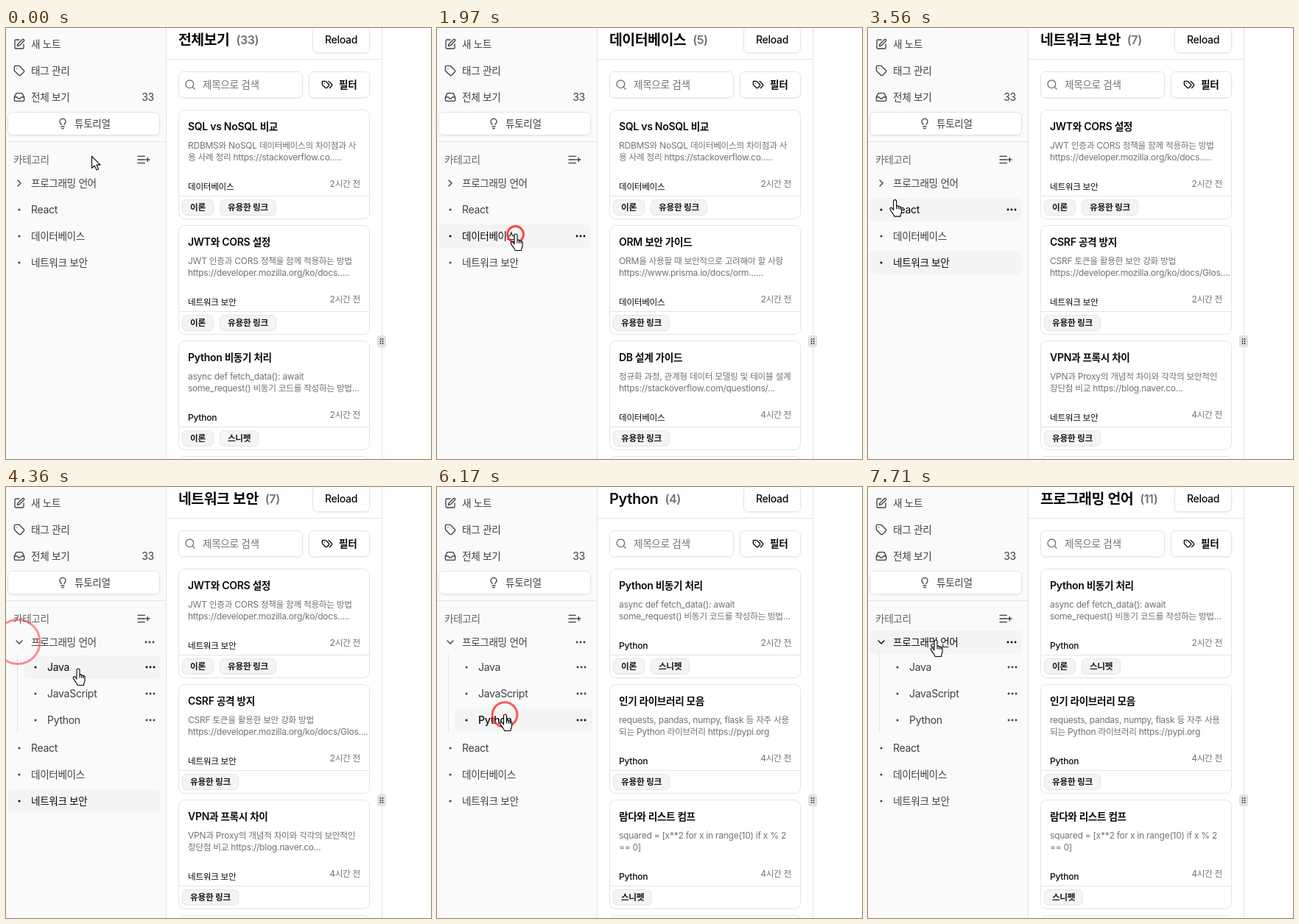
These frames come from a looping animation (577x586 px, 8.24 s). An HTML page:

```html
<!DOCTYPE html>
<html lang="ko">
<head>
<meta charset="utf-8">
<style>
html, body { margin: 0; width: 100%; height: 100%; overflow: hidden; background: #fff; }
svg { display: block; width: 577px; height: 586px; }
text { font-family: Inter, "Noto Sans CJK KR", "Noto Sans CJK", sans-serif; letter-spacing: -.02em; white-space: pre; }
.ko { font-family: "Noto Sans CJK KR", "Noto Sans CJK", sans-serif; font-size: .97em; letter-spacing: -.025em; }
.icon { fill: none; stroke-width: 2; stroke-linecap: round; stroke-linejoin: round; }
</style>
</head>
<body>
<svg viewBox="0 0 577 586">
  <defs>
    <clipPath id="column"><rect x="234" y="0" width="259.5" height="586"/></clipPath>
    <filter id="soft" x="-10%" y="-20%" width="120%" height="150%">
      <feDropShadow dx="0" dy="1" stdDeviation="1" flood-opacity=".07"/>
    </filter>
  </defs>
  <rect width="577" height="586" fill="#fff"/>
  <rect width="217" height="586" fill="#fafafa"/>
  <g id="chrome"></g>
  <g id="tree"></g>
  <g id="notes"></g>
  <g id="rings" fill="none" stroke="#ff2020" stroke-width="3"></g>
  <g id="cursor" fill="#fff" stroke="#000" stroke-width="1.1" stroke-linejoin="round">
    <path id="arrow" d="M0 0v16l3.7-3.4 2.6 5.8 2.8-1.2-2.6-5.6h5z"/>
    <path id="hand" d="M-1.5 1.5a2 2 0 0 1 4 0v6.5a1.6 1.6 0 0 1 2.6.6a1.6 1.6 0 0 1 2.4.9a1.4 1.4 0 0 1 2 1.2v4.3c0 3-1.6 4-1.6 7h-8.4c0-3-4-5-5.5-9.5c-.8-2.4 1.8-3.2 3-1.2l1.5 2.2zM2.5 8v4M5.1 8.8v3.4M7.5 9.6v3"/>
  </g>
</svg>
<script>
const LOOP = 8240, RING = 825;
const INK = '#0a0a0a', TEXT = '#3f3f46', MUTED = '#71717a', LINE = '#e4e4e7', HOVER = '#f4f4f5';
const $ = id => document.getElementById(id);

const text = (x, y, str, size = 14, weight = 400, fill = TEXT, anchor = 'start') =>
  `<text x="${x}" y="${y}" font-size="${size}" font-weight="${weight}" fill="${fill}" text-anchor="${anchor}">${korean(str)}</text>`;
const korean = str => str.replace(/[가-힣]+/g, '<tspan class="ko">$&</tspan>');
const box = (x, y, w, h, r, extra = '') =>
  `<rect x="${x + .5}" y="${y + .5}" width="${w - 1}" height="${h - 1}" rx="${r}" fill="#fff" stroke="${LINE}" ${extra}/>`;
const line = d => `<path d="${d}" stroke="${LINE}" fill="none"/>`;
// 24-unit icon drawn at 16px around a centre
const icon = (cx, cy, d, color = TEXT) =>
  `<path class="icon" stroke="${color}" transform="translate(${cx - 8} ${cy - 8}) scale(.6667)" d="${d}"/>`;
const SOFT = 'filter="url(#soft)"';

const ICONS = {
  pen: 'M12 3H5a2 2 0 0 0-2 2v14a2 2 0 0 0 2 2h14a2 2 0 0 0 2-2v-7M18.4 2.6a2.1 2.1 0 0 1 3 3l-9 9L8 16l1-4z',
  tag: 'M12.6 2.6A2 2 0 0 0 11.2 2H4a2 2 0 0 0-2 2v7.2a2 2 0 0 0 .6 1.4l8.7 8.7a2.4 2.4 0 0 0 3.4 0l6.6-6.6a2.4 2.4 0 0 0 0-3.4zM7.5 7.5h.01',
  inbox: 'M22 12h-6l-2 3h-4l-2-3H2M5.5 5.1 2 12v6a2 2 0 0 0 2 2h16a2 2 0 0 0 2-2v-6l-3.5-6.9A2 2 0 0 0 16.8 4H7.2a2 2 0 0 0-1.7 1.1z',
  bulb: 'M15 14c.2-1 .7-1.7 1.5-2.5C17.5 10.6 18 9.4 18 8A6 6 0 0 0 6 8c0 1 .2 2.2 1.5 3.5.7.7 1.3 1.5 1.5 2.5M9 18h6M10 22h4',
  listPlus: 'M0 5h14M0 12h14M0 19h14M16 12h8M20 8v8',
  right: 'm9 18 6-6-6-6',
  down: 'm6 9 6 6 6-6',
  search: 'M19 11a8 8 0 1 1-16 0a8 8 0 0 1 16 0M21 21l-4.3-4.3',
  tags: 'm15 5 6.3 6.3a2.4 2.4 0 0 1 0 3.4L17 19M9.6 5.6A2 2 0 0 0 8.2 5H3a1 1 0 0 0-1 1v5.2a2 2 0 0 0 .6 1.4l5.7 5.7a2.4 2.4 0 0 0 3.4 0l3.6-3.6a2.4 2.4 0 0 0 0-3.4zM6.5 9.5h.01'
};

const TAG_WIDTH = { '이론': 43, '유용한 링크': 77, '스니펫': 53 };
const THEORY = ['이론'], LINK = ['유용한 링크'], CODE = ['스니펫'];

// note: title, first line, second line, category, hours ago, tags
const sql = ['SQL vs NoSQL 비교', 'RDBMS와 NoSQL 데이터베이스의 차이점과 사', '용 사례 정리 https://stackoverflow.co.....', '데이터베이스', 2, [...THEORY, ...LINK]];
const jwt = ['JWT와 CORS 설정', 'JWT 인증과 CORS 정책을 함께 적용하는 방법', 'https://developer.mozilla.org/ko/docs.....', '네트워크 보안', 2, [...THEORY, ...LINK]];
const asyncPy = ['Python 비동기 처리', 'async def fetch_data(): await', 'some_request() 비동기 코드를 작성하는 방법...', 'Python', 2, [...THEORY, ...CODE]];
const pythonNotes = [asyncPy,
  ['인기 라이브러리 모음', 'requests, pandas, numpy, flask 등 자주 사용', '되는 Python 라이브러리 https://pypi.org', 'Python', 4, LINK],
  ['람다와 리스트 컴프', 'squared = [x**2 for x in range(10) if x % 2', '== 0]', 'Python', 4, CODE]];

const VIEWS = {
  all: ['전체보기', 33, [sql, jwt, asyncPy]],
  react: ['React', 10, [
    ['React 상태 관리', 'useState와 useReducer의 차이점과 사용', '사례 정리 https://react.dev/learn.....', 'React', 2, [...THEORY, ...LINK]],
    ['useEffect 사용법', 'useEffect(() => { fetchData(); }, []);', '의존성 배열을 다루는 방법', 'React', 2, CODE],
    ['컴포넌트 최적화', 'memo와 useMemo를 활용하여 렌더링을', '효율적으로 관리하는 방법...', 'React', 4, THEORY]]],
  db: ['데이터베이스', 5, [sql,
    ['ORM 보안 가이드', 'ORM을 사용할 때 보안적으로 고려해야 할 사항', 'https://www.prisma.io/docs/orm......', '데이터베이스', 2, LINK],
    ['DB 설계 가이드', '정규화 과정, 관계형 데이터 모델링 및 테이블 설계', 'https://stackoverflow.com/questions/...', '데이터베이스', 4, LINK]]],
  net: ['네트워크 보안', 7, [jwt,
    ['CSRF 공격 방지', 'CSRF 토큰을 활용한 보안 강화 방법', 'https://developer.mozilla.org/ko/docs/Glos....', '네트워크 보안', 2, LINK],
    ['VPN과 프록시 차이', 'VPN과 Proxy의 개념적 차이와 각각의 보안적인', '장단점 비교 https://blog.naver.co...', '네트워크 보안', 4, LINK]]],
  java: ['Java', 4, [
    ['Java 스트림 정리', 'list.stream().filter(x -> x % 2 == 0)', '.collect(Collectors.toList());', 'Java', 2, CODE],
    ['JVM 메모리 구조', '힙과 스택 영역의 차이점과 가비지 컬렉션의', '동작 원리 정리', 'Java', 4, THEORY],
    ['Java 컬렉션 모음', 'List, Set, Map 등 자주 사용되는 컬렉션', 'https://docs.oracle.com/javase...', 'Java', 4, LINK]]],
  js: ['JavaScript', 3, [
    ['JS 유틸 함수 모음', 'lodash 같은 라이브러리로 유용한 유틸리티 함수', '사용하기 https://github.com/lodash/lodash...', 'JavaScript', 4, LINK],
    ['DOM 조작 기본', 'document.querySelector("#btn").addEventListener("click",', '() => alert("Clicked!"));', 'JavaScript', 4, CODE],
    ['JS 비동기 처리', 'JavaScript에서 Promise와 async/await을 활', '용하여 비동기 코드를 효율적으로 관리하는 방법...', 'JavaScript', 4, THEORY]]],
  python: ['Python', 4, pythonNotes],
  lang: ['프로그래밍 언어', 11, pythonNotes]
};

// [time, view]
const SWITCHES = [[0, 'all'], [860, 'react'], [1840, 'db'], [2700, 'net'], [4520, 'java'], [5220, 'js'], [5920, 'python'], [6950, 'lang']];
const EXPAND_AT = 3800;
// [time, x, y]
const CLICKS = [[790, 108, 255.5], [1770, 106.5, 280.5], [2630, 104.5, 314.5], [3773, 16, 210.5],
  [4450, 97.5, 247.5], [5153, 98, 281.5], [5850, 92, 309.5], [6865, 91.5, 208.5]];
// [move start, move end, x, y]
const MOVES = [[340, 470, 108, 255.5], [1100, 1400, 106.5, 280.5], [2150, 2450, 104.5, 314.5], [3250, 3700, 16, 210.5],
  [3900, 4330, 97.5, 247.5], [4750, 5000, 98, 281.5], [5270, 5500, 92, 309.5], [6180, 6600, 91.5, 208.5]];

function drawChrome() {
  const rows = [['pen', '새 노트', 22], ['tag', '태그 관리', 58], ['inbox', '전체 보기', 94]];
  let grip = '';
  for (let i = 0; i < 6; i++) grip += `<circle cx="${508.5 + i % 2 * 3}" cy="${423 + (i >> 1) * 3}" r=".9" fill="#27272a"/>`;
  $('chrome').innerHTML = rows.map(([name, label, y]) => icon(18, y, ICONS[name]) + text(34, y + 5, label)).join('')
    + text(201, 99, '33', 14, 400, TEXT, 'end')
    + box(2, 114, 207, 32, 6, SOFT) + icon(77, 130, ICONS.bulb) + text(93, 135, '튜토리얼')
    + line('M0 154.5H217M217.5 0V586M510.5 0V586M218 42.5H510')
    + text(10, 184, '카테고리', 14, 400, '#63636b') + icon(187, 179, ICONS.listPlus)
    + box(416, -2, 78, 36, 6, SOFT) + text(455, 21, 'Reload', 14, 500, INK, 'middle')
    + box(234, 59, 169, 36, 6, SOFT) + icon(250, 77, ICONS.search, MUTED) + text(267, 82, '제목으로 검색', 14, 400, MUTED)
    + box(411, 59, 83, 36, 6, SOFT) + icon(436, 77, ICONS.tags, INK) + text(452, 82, '필터', 14, 600, INK)
    + `<rect x="504.5" y="418.5" width="11" height="15" rx="2.5" fill="${LINE}" stroke="#dcdce0"/>` + grip;
}

function noteCard([title, first, second, category, hours, tags], i) {
  const y = 111 + i * 157;
  let x = 239, chips = '';
  for (const tag of tags) {
    const w = TAG_WIDTH[tag];
    chips += `<rect x="${x + .5}" y="${y + 122.5}" width="${w - 1}" height="21" rx="6" fill="${HOVER}" stroke="${LINE}"/>`
      + text(x + w / 2, y + 137, tag, 12, 600, '#18181b', 'middle');
    x += w + 8;
  }
  return box(234, y, 260, 149, 8) + line(`M235 ${y + 117.5}H493`)
    + text(247, y + 28, title, 14, 600, INK)
    + `<g clip-path="url(#column)">${text(247, y + 53, first, 12, 400, MUTED)}${text(247, y + 69, second, 12, 400, MUTED)}</g>`
    + text(247, y + 109, category, 12, 500, INK)
    + text(481, y + 105, hours + '시간 전', 12, 400, MUTED, 'end') + chips;
}

function drawNotes(view) {
  const [title, count, notes] = VIEWS[view];
  $('notes').innerHTML = `<text x="234" y="23" font-size="20" font-weight="600" fill="${INK}">${korean(title)}`
    + `<tspan dx="9" dy="-1.5" font-size="16" fill="${MUTED}">(${count})</tspan></text>`
    + notes.map(noteCard).join('') + (count > 3 ? box(234, 582, 260, 149, 8) : '');
}

function treeRows(open) {
  const root = (id, y) => ({ id, y, child: false }), child = (id, y) => ({ id, y, child: true });
  const shift = open ? 108 : 0;
  return [root('lang', 211),
    ...(open ? [child('java', 245), child('js', 281), child('python', 317)] : []),
    root('react', 247 + shift), root('db', 283 + shift), root('net', 319 + shift)];
}

function drawTree(view, open, hovered, inGroup) {
  $('tree').innerHTML = (open ? line('M15.5 227V334') : '') + treeRows(open).map(({ id, y, child }) => {
    const selected = id === view, hover = id === hovered, left = child ? 24 : 2;
    const color = selected || hover ? INK : TEXT;
    const showDots = hover || inGroup && (child || id === 'lang');
    const mark = id === 'lang' ? icon(18, y, open ? ICONS.down : ICONS.right, color)
      : `<circle cx="${left + 16}" cy="${y}" r="1.5" fill="${color}"/>`;
    const dots = [-5, 0, 5].map(d => `<circle cx="${(child ? 196 : 195) + d}" cy="${y}" r="1.45" fill="${color}"/>`).join('');
    return (selected || hover ? `<rect x="${left}" y="${y - 16}" width="${child ? 186 : 207}" height="32" rx="6" fill="${HOVER}"/>` : '')
      + mark + text(left + 32, y + 5, VIEWS[id][0], 14, selected ? 500 : 400, color) + (showDots ? dots : '');
  }).join('');
}

function cursorAt(t) {
  let x = 116.5, y = 174.5;
  for (const [start, end, toX, toY] of MOVES) {
    if (t < start) break;
    const p = Math.min(1, (t - start) / (end - start)), e = p * p * (3 - 2 * p);
    x += (toX - x) * e;
    y += (toY - y) * e;
  }
  return [x, y];
}

let treeKey, notesKey;
function frame() {
  const t = performance.now() % LOOP;
  const view = SWITCHES.filter(s => s[0] <= t).pop()[1];
  const open = t >= EXPAND_AT;
  const [x, y] = cursorAt(t);
  const hovered = treeRows(open).find(r => Math.abs(y - r.y) <= 16)?.id;
  const inGroup = open && y > 195 && y < 335;

  const key = [view, open, hovered, inGroup].join();
  if (key !== treeKey) drawTree(view, open, hovered, inGroup);
  if (view !== notesKey) drawNotes(view);
  treeKey = key;
  notesKey = view;

  $('rings').innerHTML = CLICKS.map(([start, cx, cy]) => {
    const age = t - start;
    return age < 0 || age > RING ? '' :
      `<circle cx="${cx}" cy="${cy}" r="${1 + age * .0494}" opacity="${1 - .7 * age / RING}"/>`;
  }).join('');
  $('cursor').setAttribute('transform', `translate(${x} ${y})`);
  const pointing = y >= 195;
  $('hand').style.display = pointing ? '' : 'none';
  $('arrow').style.display = pointing ? 'none' : '';
  requestAnimationFrame(frame);
}

drawChrome();
frame();
</script>
</body>
</html>
```
